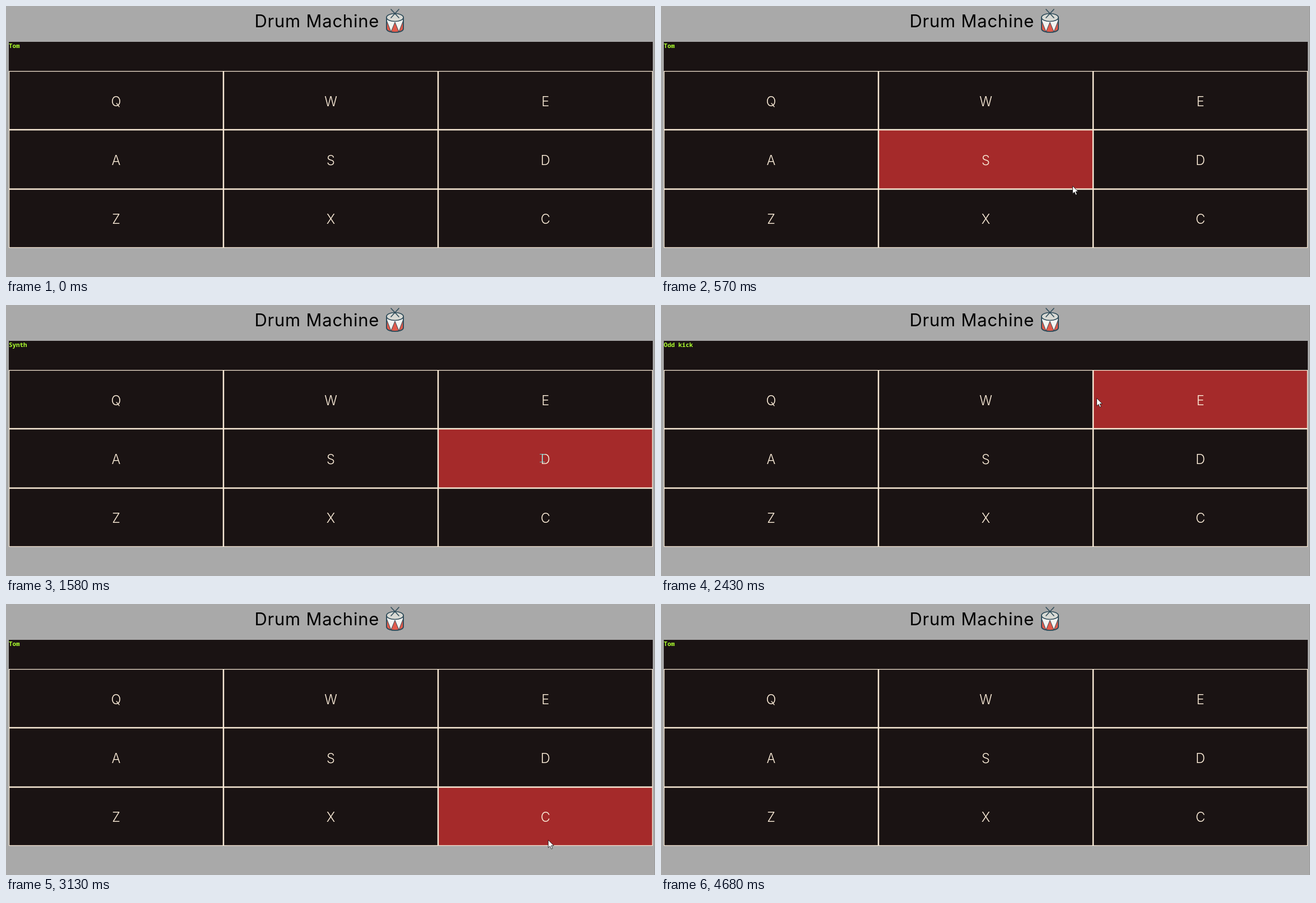
An HTML page that plays this animation: 1158x484 px, repeating every 5.06 s.

```html
<!DOCTYPE html>
<html lang="en">
<head>
<meta charset="utf-8">
<title>Drum Machine</title>
<style>
  html, body { margin: 0; width: 100%; height: 100%; overflow: hidden; background: #a9a9a9; }
  svg { display: block; width: 100vw; height: 100vh; }
  .title { font: 400 31px Inter, sans-serif; letter-spacing: .75px; }
  .key { font: 300 23.5px Inter, sans-serif; fill: #faebd7; text-anchor: middle; }
  #label { font: 600 10.83px "Noto Sans Mono", monospace; fill: #adff2f; }
</style>
</head>
<body>
<svg viewBox="0 0 1158 484">
  <rect width="1158" height="484" fill="#a9a9a9"/>
  <rect x="1157" width="1" height="484" fill="#999"/>
  <text class="title" x="443.5" y="38">Drum Machine</text>

  <g stroke="#314d5b" stroke-width="1.7" stroke-linejoin="round" stroke-linecap="round">
    <path d="M679 20V41C680 49 708 49 709 41V20Z" fill="#f4f3f0"/>
    <path d="M679.5 27L687 46Q680 44 679.5 41ZM687 46L694 29 701 46Q694 47.5 687 46ZM701 46L708.5 27V41Q708 44 701 46Z" fill="#e25b4b" stroke-width="1"/>
    <path d="M679 20V41C680 49 708 49 709 41V20" fill="none"/>
    <ellipse cx="694" cy="20.5" rx="15" ry="7" fill="#d9dad5"/>
    <path d="M687 6L701 21M701 6L687 21" fill="none"/>
  </g>

  <rect x="5" y="64" width="1149" height="53" fill="#1a1313"/>
  <text id="label" x="5" y="75"></text>
  <g id="pads"></g>
  <circle id="click" r="11" fill="#ff0" fill-opacity=".47"/>
  <path id="arrow" d="M.5 .5V14.2L3.7 11.3 6 16.5 8.2 15.5 6 10.5H10.3Z" fill="#fff" stroke="#111" stroke-width=".8"/>
  <path id="beam" d="M-1.5 -6.5H2.5M4 -6.5H7.5M-1.5 7.5H2.5M4 7.5H7.5M3.5 -6V7" fill="none" stroke="#5ad5d5"/>
</svg>
<script>
const LOOP = 5060;
const SAMPLE = 77;   // ms between two pointer samples
const EDGE = 1.25;   // pad border
const NS = 'http://www.w3.org/2000/svg';
const $ = id => document.getElementById(id);

const cols = [5, 388, 771, 1154];
const rows = [116, 221, 327, 432];

// Each move runs from the previous stop, slowing down; ex and ey are the ease-out powers.
const entry = { x: 1145, y: 455 };
const moves = [
  { at: 190, steps: 7, x: 731, y: 320, ex: 2.6, ey: 2.6 },
  { at: 1200, steps: 3, x: 954, y: 273 },
  { at: 1810, steps: 3, x: 905, y: 164 },
  { at: 2430, steps: 3, x: 723, y: 167 },
  { at: 3130, steps: 2, x: 1002, y: 457 },
  { at: 3510, steps: 7, x: 1145, y: 483, ex: 1.64 }
];
const GONE = 4680;

// A sound is named when its press is released.
const clicks = [
  { down: 880, up: 1030, sound: 'Tom' },
  { down: 1500, up: 1580, sound: 'Synth' },
  { down: 2120, up: 2200, sound: 'Odd kick' },
  { down: 2730, up: 2900, sound: 'Tom' },
  { down: 4130, up: 4280, sound: 'Tom' }
];

function add(tag, attrs, text = '') {
  const el = document.createElementNS(NS, tag);
  for (const k in attrs) el.setAttribute(k, attrs[k]);
  el.textContent = text;
  $('pads').appendChild(el);
  return el;
}

const pads = [...'QWEASDZXC'].map((key, i) => {
  const c = i % 3, r = Math.floor(i / 3);
  const x = cols[c], y = rows[r], w = cols[c + 1] - x, h = rows[r + 1] - y;
  add('rect', { x, y, width: w, height: h, fill: '#faebd7' });
  const face = add('rect', { x: x + EDGE, y: y + EDGE, width: w - 2 * EDGE, height: h - 2 * EDGE });
  add('text', { class: 'key', x: x + w / 2, y: 179 + 105 * r }, key);
  return { face, x, y, w, h };
});

const easeOut = (p, power) => 1 - (1 - p) ** power;
const mix = (a, b, p) => a + (b - a) * p;

function pointerAt(t) {
  if (t < moves[0].at || t >= GONE) return null;
  const i = moves.findLastIndex(m => t >= m.at);
  const { at, steps, x, y, ex = 3, ey = 3 } = moves[i];
  const from = moves[i - 1] || entry;
  // The slack absorbs rounding of the sample times.
  const step = Math.floor((t - at + 8) / SAMPLE) + 1;
  const p = Math.min(1, step / steps);
  return {
    x: Math.round(mix(from.x, x, easeOut(p, ex))),
    y: Math.round(mix(from.y, y, easeOut(p, ey)))
  };
}

function place(el, pos, shown) {
  el.style.display = shown ? '' : 'none';
  if (shown) el.setAttribute('transform', `translate(${pos.x} ${pos.y})`);
}

function draw(t) {
  const pos = pointerAt(t);
  let onText = false;
  for (const p of pads) {
    const over = pos && pos.x >= p.x && pos.x < p.x + p.w && pos.y >= p.y && pos.y < p.y + p.h;
    p.face.setAttribute('fill', over ? '#a52a2a' : '#1a1313');
    if (over) onText = Math.abs(pos.x - p.x - p.w / 2) < 12 && Math.abs(pos.y - p.y - p.h / 2) < 14;
  }

  const last = clicks.findLast(c => t >= c.up);
  $('label').textContent = last ? last.sound : 'Tom';
  place($('click'), pos, clicks.some(c => t >= c.down && t < c.up));
  place($('arrow'), pos, pos && !onText);
  place($('beam'), pos, onText);
}

const start = performance.now();
function tick() {
  draw((performance.now() - start) % LOOP);
  requestAnimationFrame(tick);
}
tick();
</script>
</body>
</html>
```
